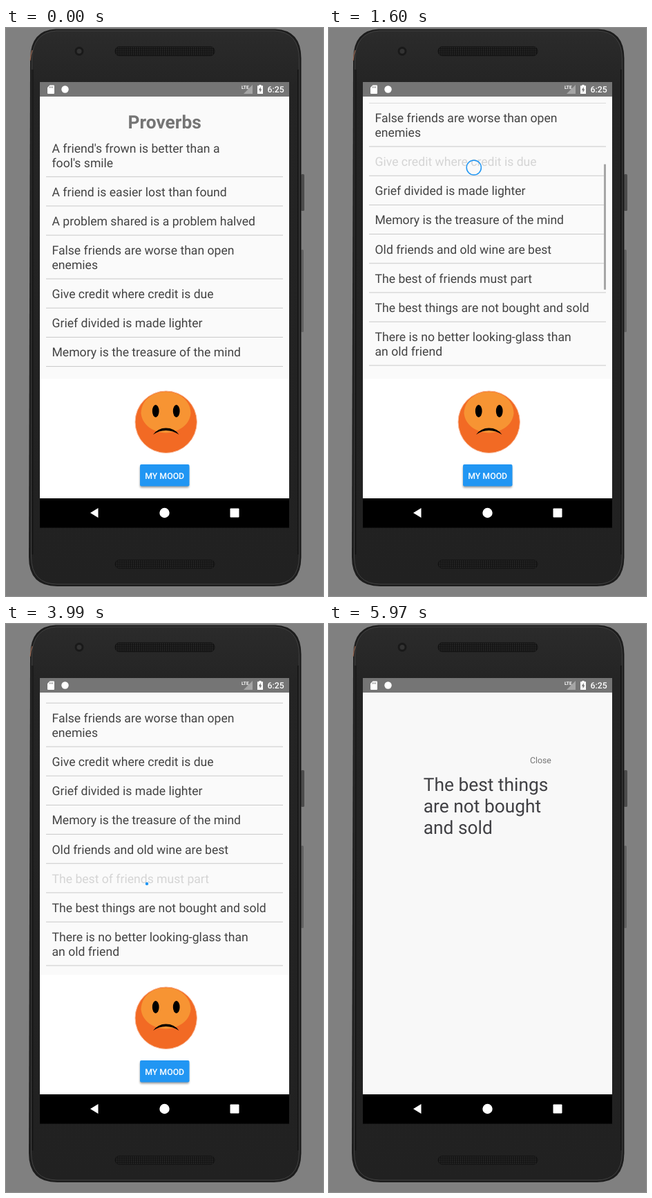
An HTML page for the animation above (8 s loop, 459 by 820 pixels).

```html
<!DOCTYPE html>
<html lang="en">
<head>
<meta charset="utf-8">
<title>Proverbs</title>
<style>
  html, body { margin: 0; width: 100%; height: 100%; overflow: hidden; background: #808080; }
  svg { display: block; width: 459px; height: 820px; }
  text { font-family: Roboto, "Noto Sans", sans-serif; text-rendering: geometricPrecision; }
  .item text { font-size: 17.6px; fill: #434343; }
  .item rect { fill: #c9c9c9; }
</style>
</head>
<body>
<svg viewBox="0 0 459 820">
  <defs>
    <clipPath id="view"><rect x="58" y="108" width="343" height="390"/></clipPath>
    <pattern id="mesh" width="3" height="3" patternUnits="userSpaceOnUse">
      <rect width="3" height="3" fill="#121212"/>
      <circle cx="1.5" cy="1.5" r=".9" fill="#2e2e2e"/>
    </pattern>
    <linearGradient id="shell" x1="0" y1="0" x2="0" y2="1">
      <stop offset="0" stop-color="#2b2b2b"/>
      <stop offset=".1" stop-color="#242424"/>
      <stop offset="1" stop-color="#212121"/>
    </linearGradient>
    <filter id="soft" x="-20%" y="-40%" width="140%" height="200%"><feGaussianBlur stdDeviation="1.6"/></filter>
  </defs>

  <!-- phone -->
  <rect width="459" height="820" fill="#808080"/>
  <rect x="427" y="211" width="5" height="53" rx="1.5" fill="#4c4c4c"/>
  <rect x="427" y="320" width="4" height="119" rx="1.5" fill="#626262"/>
  <path d="M72 1.5H390Q427.5 3 427.5 44V764Q427 806 388 806H74Q33 806 33 764L35 44Q36 3 72 1.5Z" fill="#1d1d1d"/>
  <path d="M73 4H389Q424.5 6 424.5 45V763Q424 803 387 803H75Q36.5 803 36.5 763L37.5 45Q39 6 73 4Z" fill="url(#shell)" stroke="#424242"/>
  <path d="M35 47Q35.5 39 38 32" fill="none" stroke="#9a6a55" stroke-width="1.2"/>
  <path d="M38.5 60V760M423 60V760" stroke="#161616" stroke-width="2"/>
  <circle cx="106" cy="33.5" r="6.5" fill="#191919"/>
  <circle cx="106" cy="33.5" r="3.5" fill="#333"/>
  <rect x="158" y="27" width="144" height="13" rx="6" fill="url(#mesh)" stroke="#141414"/>
  <rect x="158" y="768" width="144" height="12" rx="6" fill="url(#mesh)" stroke="#141414"/>

  <!-- screen -->
  <rect x="49" y="98" width="361" height="409" fill="#fafafa"/>
  <rect x="49" y="506.5" width="361" height="173" fill="#fff"/>
  <rect x="49" y="78" width="361" height="21" fill="#757575"/>
  <rect x="49" y="679" width="361" height="42.5" fill="#000"/>

  <!-- status and navigation bars -->
  <g fill="#fff">
    <path d="M63.5 82.500H69Q70 82.500 70 83.500V94Q70 95 69 95H61Q60 95 60 94V86Z"/>
    <path d="M63.5 84.500v2M65.500 84.500v2M67.500 84.500v2" stroke="#757575"/>
    <circle cx="85.500" cy="88.500" r="5.200"/>
    <text x="341" y="88" font-size="6.500" font-weight="700">LTE</text>
    <path d="M357 82V95H344Z" opacity=".35"/>
    <path d="M366.500 82h3v1.300h2.500V95H364V83.300h2.500Z"/>
    <path d="M368.800 85L365.800 89.700H367.600V93.300L370.400 88.500H368.800Z" fill="#757575"/>
    <text x="378.500" y="93.300" font-size="12.300" font-weight="500">6:25</text>
    <path d="M122 700L133.500 693V707Z"/>
    <circle cx="229.500" cy="700" r="7.200"/>
    <rect x="324.500" y="693.500" width="13" height="13" rx="1"/>
  </g>

  <g id="home">
    <g clip-path="url(#view)">
      <g id="list">
        <text x="229.700" y="144.800" font-size="26.340" font-weight="700" fill="#757575" text-anchor="middle">Proverbs</text>
      </g>
      <rect id="bar" x="398" width="3" height="181" fill="#a6a6a6"/>
    </g>
    <!-- mood -->
    <circle cx="231.700" cy="568.800" r="44.700" fill="#f26a24" stroke="#f9b796"/>
    <path d="M195.500 556C197 515 266 515 267.500 556C266 573 250 584 231.500 584.500C213 584 197 573 195.500 556Z" fill="#f79433"/>
    <ellipse cx="216.700" cy="553" rx="4.900" ry="9"/>
    <ellipse cx="246.700" cy="553" rx="4.900" ry="9"/>
    <path d="M213 587Q220 577.500 231.500 577.500Q244 577.500 250.500 587Q242 581 231.500 581Q221 581 213 587Z"/>
    <rect x="194" y="632.500" width="71" height="31" rx="2" opacity=".4" filter="url(#soft)"/>
    <rect x="194" y="630" width="71.500" height="31.500" rx="2" fill="#2196f3"/>
    <text x="229.700" y="650.500" font-size="12.300" font-weight="500" fill="#fff" text-anchor="middle">MY MOOD</text>
  </g>

  <g id="detail">
    <rect x="49" y="99" width="361" height="580" fill="#f8f8f8"/>
    <text x="291" y="200.700" font-size="12.300" fill="#757575">Close</text>
    <g font-size="26.340" fill="#404044">
      <text x="136.700" y="241.300">The best things</text>
      <text x="136.700" y="272.200">are not bought</text>
      <text x="136.700" y="303.100">and sold</text>
    </g>
  </g>
  <circle id="touch" stroke="#2196f3"/>
</svg>
<script>
(() => {
  const LOOP = 8000, OPEN = 5970, RING = 80;
  const ROW = 42.17, LINE = 20.8, VIEW_TOP = 108, BAR_RATIO = 390 / 840;

  const el = id => document.getElementById(id);
  const show = (id, on) => { el(id).style.display = on ? '' : 'none'; };
  const set = (node, attrs) => {
    for (const key in attrs) node.setAttribute(key, attrs[key]);
    return node;
  };
  const make = (tag, attrs, parent) =>
    parent.appendChild(set(document.createElementNS('http://www.w3.org/2000/svg', tag), attrs));
  const ramp = (t, from, to) => Math.min(1, Math.max(0, (t - from) / (to - from)));
  const ease = u => u * u * (3 - 2 * u);

  const proverbs = [
    "A friend's frown is better than a|fool's smile",
    'A friend is easier lost than found',
    'A problem shared is a problem halved',
    'False friends are worse than open|enemies',
    'Give credit where credit is due',
    'Grief divided is made lighter',
    'Memory is the treasure of the mind',
    'Old friends and old wine are best',
    'The best of friends must part',
    'The best things are not bought and sold',
    'There is no better looking-glass than|an old friend',
    'A loveless life is a living death',
    "All's fair in love and war",
    'Better to have loved and lost, than to|have never loved at all'
  ];

  let edge = 152.3;
  const labels = proverbs.map(words => {
    const item = make('g', { class: 'item' }, el('list'));
    const label = make('g', {}, item);
    const lines = words.split('|');
    lines.forEach((line, i) => {
      make('text', { x: 66.5, y: edge + 27.5 + i * LINE }, label).textContent = line;
    });
    edge += ROW + (lines.length - 1) * LINE;
    make('rect', { x: 58, y: edge - 1, width: 343, height: 1 }, item);
    return label;
  });

  // Each drag moves the list by some pixels
  const drags = [
    { from: 690, to: 1362, by: 191 },
    { from: 1660, to: 2270, by: -191 },
    { from: 2480, to: 3000, by: 185 },
    { from: 4080, to: 4500, by: 140 },
    { from: 4500, to: 4850, by: -38 }
  ];
  const scrollAt = t => drags.reduce((sum, d) => sum + d.by * ease(ramp(t, d.from, d.to)), 0);

  // The finger sits at y - scroll; slop is the travel before the list follows
  const touches = [
    { item: 4, down: 670, up: 1560, x: 207, dx: 3, y: 392.5, slop: 8 },
    { item: 4, down: 1560, up: 2270, x: 210, dx: -6, y: 401, slop: -8 },
    { item: 3, down: 2370, up: 3180, x: 204.5, dx: -5, y: 348, slop: 8 },
    { item: 8, down: 3990, up: 4770, x: 204, dx: -12, y: 550, slop: 10 },
    { item: 9, down: 5680, up: 5860, x: 205, dx: 0, y: 598, slop: 0 }
  ];

  function drawTouch(t, offset) {
    const touch = touches.find(p => t >= p.down && t < p.up + RING);
    show('touch', touch);
    if (!touch) return;
    const age = t - touch.down, lifted = t >= touch.up;
    set(el('touch'), {
      cx: touch.x + touch.dx * age / 1000,
      cy: touch.y - offset + touch.slop * (1 - ramp(age, 0, 110)),
      r: lifted ? 10.6 : 2.2 + 4.8 * ramp(age, 0, 150),
      fill: lifted ? 'none' : '#2196f3',
      'stroke-width': lifted ? 1.5 : 0
    });
  }

  // A pressed label dims at once, then recovers
  function drawPress(t) {
    const press = touches.filter(p => t >= p.down).pop();
    labels.forEach((label, i) => {
      const dim = press && press.item === i ? 1 - ramp(t - press.down, 150, 400) : 0;
      set(label, { opacity: 1 - .8 * dim });
    });
  }

  const barAlpha = t => t < 4080
    ? (t < 690 ? 0 : 1 - ramp(t, 3430, 3680))
    : 1 - ramp(t, 5230, 5480);

  function draw(t) {
    const offset = scrollAt(t);
    set(el('list'), { transform: `translate(0 ${-offset})` });
    set(el('bar'), { y: VIEW_TOP + offset * BAR_RATIO, opacity: barAlpha(t) });
    drawPress(t);
    drawTouch(t, offset);
    show('home', t < OPEN);
    show('detail', t >= OPEN);
  }

  const start = performance.now();
  function frame() {
    draw((performance.now() - start) % LOOP);
    requestAnimationFrame(frame);
  }
  frame();
})();
</script>
</body>
</html>
```
